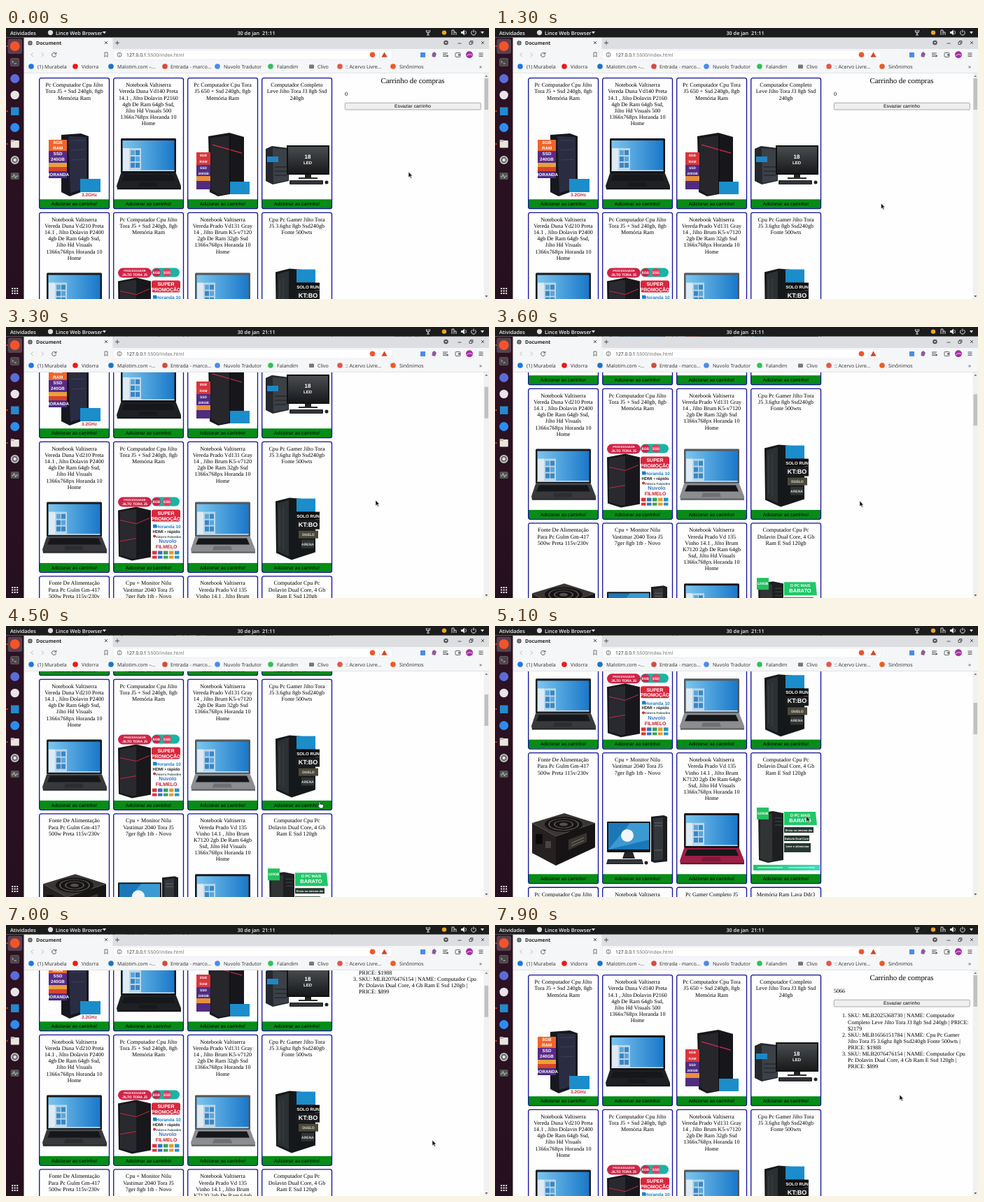
Write an HTML page that moves like this. It is 690 px wide and 388 px high and loops after 8 s.

```html
<!DOCTYPE html>
<html lang="pt-BR">
<head>
<meta charset="utf-8">
<title>Document</title>
<style>
html, body { margin: 0; width: 100%; height: 100%; overflow: hidden; background: #fefefe; }
svg { display: block; width: 690px; height: 388px; text-rendering: geometricPrecision; }
.serif { font-family: "Liberation Serif", serif; }
.sans { font-family: "Liberation Sans", sans-serif; }
.ui { font-family: "Open Sans", sans-serif; }
</style>
</head>
<body>
<svg id="stage" viewBox="0 0 690 388"></svg>
<script>
const rect = (x, y, w, h, fill, more = '') =>
  `<rect x="${x}" y="${y}" width="${w}" height="${h}" fill="${fill}" ${more}/>`;
const dot = (x, y, r, fill, more = '') => `<circle cx="${x}" cy="${y}" r="${r}" fill="${fill}" ${more}/>`;
const poly = (pts, fill, more = '') => `<polygon points="${pts}" fill="${fill}" ${more}/>`;
const line = (d, color, w = 1) => `<path d="${d}" fill="none" stroke="${color}" stroke-width="${w}"/>`;
const text = (x, y, size, str, more = '', font = 'ui') =>
  `<text x="${x}" y="${y}" font-size="${size}" class="${font}" ${more}>${str}</text>`;
const mid = 'text-anchor="middle"';
const label = (x, y, size, str, fill = '#fff') =>
  text(x, y, size, str, `${mid} font-weight="bold" fill="${fill}"`, 'sans');

// Product pictures, relative to the card corner
const laptop = (body, base) =>
  rect(11, 87, 79, 50, body, 'rx="1.5"') + rect(13.5, 90, 74, 44, 'url(#desk)') +
  rect(14, 101, 9, 32, '#dfeaf3') + rect(23, 101, 17, 32, '#b9d6ea') +
  [0, 1, 2, 3, 4, 5].map(i => rect(25 + i % 2 * 7, 104 + (i >> 1) * 9, 6, 7, i % 3 ? '#3a86c4' : '#5aa5d8')).join('') +
  rect(13.5, 132.5, 74, 1.5, '#d3e3ee') +
  poly('11,137 90,137 97,155 97,160 6,160 5,155', base) +
  poly('16,139 85,139 89,148 12,148', '#16171a') + poly('38,150 62,150 64,156 36,156', '#0003') +
  rect(6, 158, 91, 2.5, '#0005');

const stickers = (x, y, w, list) => list.map(([h, fill, str]) => {
  const s = rect(x, y, w, h, fill) + (str ? label(x + w / 2, y + h * .72, w * .24, str) : '');
  y += h;
  return s;
}).join('');

const stickerTower = () =>
  poly('32,82 60,80 71,84 71,160 44,170 32,164', '#16171f') + poly('42,84 68,85 68,158 45,165', '#2a2d42') +
  line('M46 90L66 90M46 104L66 103M47 118L66 117', '#41455c', .8) +
  stickers(14, 89, 26, [[8, '#f0642a', '8GB'], [8, '#f0642a', 'RAM'], [8, '#5a2b86', 'SSD'],
    [9, '#5a2b86', '240GB'], [6, '#e8a13a', ''], [6, '#d8432c', ''], [10, '#4b2d83', 'HORANDA']]) +
  rect(59, 145, 29, 19, '#1b8dcb') + label(72, 170, 6.5, '3.2GHz', '#d3263a');

const redLineTower = () =>
  poly('30,84 60,79 81,85 81,163 44,170 32,164', '#17171b') + poly('33,87 60,83 60,166 45,168 34,161', '#26262b') +
  line('M36 96L78 108', '#d22c50', 1.3) + line('M61 82V166', '#08080a') +
  stickers(13, 107, 20, [[9, '#d8363c', '8GB'], [9, '#d8363c', 'RAM'], [8, '#4f2c80', 'SSD'],
    [8, '#4f2c80', '240GB'], [7, '#e7903a', ''], [12, '#4f2c80', '']]) +
  rect(61, 149, 28, 18, '#1b8dcb');

const ledKit = () =>
  poly('6,102 15,98 39,101 39,148 16,153 6,148', '#25282d') + poly('16,101 38,103 38,147 17,151', '#3c4148') +
  rect(8, 113, 16, 8, '#1d87c6') + line('M19 128H36M19 134H36M19 140H36', '#1b1d20', 1.2) +
  rect(36, 97, 61, 42, '#111') + rect(38, 99, 57, 38, 'url(#city)') +
  label(66, 116, 8, '18') + label(66, 124, 6, 'LED') + rect(62, 139, 9, 5, '#222') +
  rect(53, 143, 27, 2, '#2b2b2b') + rect(40, 147, 48, 6, '#25262a', 'rx="1"') + dot(93, 150, 2.5, '#222') +
  line('M42 149H86M42 151H86', '#555', .6);

const promoTower = () =>
  rect(7, 80, 48, 14, '#cf2447', 'rx="7"') + label(31, 85.5, 4, 'PROCESSADOR') + label(31, 91.5, 5, 'JILTO TORA J5') +
  rect(55, 80, 40, 13, '#1bb3a4', 'rx="6.5"') + dot(62, 86.5, 6, '#cf2447') + dot(77, 86.5, 6, '#e53d5d') +
  label(62, 88.5, 5, '8GB') + label(77, 88.5, 5, 'SSD') +
  poly('7,99 33,94 54,99 54,166 27,171 8,165', '#18181c') + poly('10,101 33,97 33,167 27,168 10,163', '#292930') +
  line('M10 113L33 118L52 110M10 143L33 139', '#c62b3c', 1) +
  rect(55, 98, 41, 17, '#d9273d', 'rx="3"') + label(75.5, 105.5, 7, 'SUPER') + label(75.5, 113, 7, 'PROMOÇÃO') +
  rect(57, 119, 5, 5, '#1a7fd0') + label(79, 124.5, 6.5, 'Horanda 10', '#1a7fd0') +
  label(76, 131, 6, 'HDMI ▪ rápido', '#222') +
  dot(59, 136, 2, '#d42d2d') + label(79, 138, 4.5, 'Vidorra Falandim', '#355') +
  label(78, 145.5, 7.5, 'Nuvolo', '#3574c8') + label(76, 153.5, 7, 'FILMELO', '#d11f2a') +
  ['#d33', '#3a6fc0', '#35a35a', '#e29a2b', '#2a93c9'].map((c, i) => rect(56 + i * 8, 157, 6.5, 5, c) + rect(56 + i * 8, 164, 6.5, 4, c)).join('');

const gamerTower = () =>
  poly('20,86 40,81 77,84 77,159 43,170 21,160', '#15181a') + poly('23,89 39,84 39,165 23,158', '#2b3032') +
  line('M26 96V152M31 94V155', '#444b4d', .8) +
  rect(50, 82, 27, 19, '#1b8dcb') + rect(50, 101, 33, 11, '#0c0c0c') + label(66.5, 109, 6.2, 'SOLO RUN') +
  rect(50, 112, 33, 14, '#1b1d1f') + label(66.5, 122, 9, 'KT:BO') +
  rect(53, 128, 28, 11, '#4d4a3b') + label(67, 135.5, 5, 'DUELO', '#ddd') +
  rect(57, 141, 18, 12, '#2f3533') + label(66, 149, 5, 'ARENA', '#ddd');

const powerUnit = () =>
  poly('6,101 52,87 96,101 40,120', '#3a3634') + poly('6,101 40,120 40,162 6,144', '#242120') +
  poly('40,120 96,101 96,136 40,162', '#161414') +
  '<g transform="translate(51 103) scale(1 .4)">' + dot(0, 0, 27, '#151313') + dot(0, 0, 21, 'none', 'stroke="#5a5552" stroke-width="2"') +
  dot(0, 0, 13, 'none', 'stroke="#5a5552" stroke-width="2"') + dot(0, 0, 6, '#55504d') + '</g>' +
  rect(11, 117, 10, 14, '#0c0b0b') + rect(25, 127, 8, 10, '#4a4542') + poly('58,125 84,115 84,128 58,140', '#39342f') +
  line('M62 130L80 122M62 134L80 126', '#8d877f', .8);

const deskKit = () =>
  rect(7, 99, 62, 44, '#15171a', 'rx="1"') + rect(9, 101, 58, 38, '#1c77b8') + poly('9,139 40,101 67,101 67,125', '#3b9ad2') +
  dot(36, 119, 9, '#f2f6f9') + poly('32,143 44,143 47,152 29,152', '#24262a') +
  poly('70,92 88,90 93,92 93,156 75,158 70,156', '#1b1d20') + poly('73,95 87,93 87,153 74,155', '#33363a') +
  line('M75 101H86M75 105H86M75 140H86', '#777', .8) +
  poly('8,153 57,153 59,160 6,160', '#25272b') + line('M9 155.5H57M9 157.5H57', '#5c5f64', .6) + dot(63, 158, 2.5, '#222');

const greenTower = () =>
  poly('11,87 32,84 47,87 47,154 25,158 12,154', '#1d1f20') + poly('14,90 31,88 31,155 25,156 14,152', '#313435') +
  line('M35 94H45M35 99H45M35 104H45', '#555', .8) +
  rect(9, 79, 17, 17, '#22c25e') + label(17.5, 89, 5, '120GB') +
  poly('48,85 93,85 95,104 48,104', '#21c768') + label(71, 92, 5.5, 'O PC MAIS') + label(71, 100, 7.5, 'BARATO') +
  [[107, 42, 'Envia no mesmo dia'], [119, 36, 'Dolavin Dual Core'], [130, 38, 'Leve e silencioso']].map(([y, w, s]) =>
    rect(48, y, w, 8, '#25382f') + label(48 + w / 2, y + 5.6, 4, s)).join('') +
  rect(48, 138, 38, 5, '#25382f') + rect(4, 161, 95, 8, 'url(#strip)') + line('M10 165H46M54 165H92', '#e6fff3', 1);

const cards = [
  ['Pc Computador Cpu Jilto|Tora J5 + Ssd 240gb, 8gb|Memória Ram', stickerTower()],
  ['Notebook Valtiserra|Vereda Duna Vd140 Preta|14.1 , Jilto Dolavin P2160|4gb De Ram 64gb Ssd,|Jilto Hd Visuals 500|1366x768px Horanda 10|Home', laptop('#131417', '#1f2024')],
  ['Pc Computador Cpu Tora|J5 650 + Ssd 240gb, 8gb|Memória Ram', redLineTower()],
  ['Computador Completo|Leve Jilto Tora J3 8gb Ssd|240gb', ledKit()],
  ['Notebook Valtiserra|Vereda Duna Vd210 Preta|14.1 , Jilto Dolavin P2400|4gb De Ram 64gb Ssd,|Jilto Hd Visuals|1366x768px Horanda 10|Home', laptop('#1b1c1f', '#38393d')],
  ['Pc Computador Cpu Jilto|Tora J5 + Ssd 240gb, 8gb|Memória Ram', promoTower()],
  ['Notebook Valtiserra|Vereda Prado Vd131 Gray|14 , Jilto Brum K5-v7120|2gb De Ram 32gb Ssd|1366x768px Horanda 10|Home', laptop('#55585c', '#8b8d90')],
  ['Cpu Pc Gamer Jilto Tora|J5 3.6ghz 8gb Ssd240gb|Fonte 500wts', gamerTower()],
  ['Fonte De Alimentação|Para Pc Gulm Gm-417|500w Preta 115v/230v', powerUnit()],
  ['Cpu + Monitor Nilu|Vastimar 2040 Tora J5|7ger 8gb 1tb - Novo', deskKit()],
  ['Notebook Valtiserra|Vereda Prado Vd 135|Vinho 14.1 , Jilto Brum|K7120 2gb De Ram 64gb|Ssd, Jilto Hd Visuals|1366x768px Horanda 10|Home', laptop('#1a1518', '#9c1f45')],
  ['Computador Cpu Pc|Dolavin Dual Core, 4 Gb|Ram E Ssd 120gb', greenTower()],
  ['Pc Computador Cpu Jilto|Tora J5 Ssd 240gb / 8gb|Memória Ram', ''],
  ['Notebook Valtiserra|Vereda Prado Vd134 Cinza|14.1 , Jilto Brum K7120|2gb De Ram 64gb Ssd,|Jilto Hd Visuals|1366x768px Horanda 10|Home', ''],
  ['Pc Gamer Completo J5|16gb 1tb Monitor + Kit|Gamer Full Hd', ''],
  ['Memória Ram Lava Ddr3|Color Azul 8gb 1 Talvoz|Tz208c11k/8', '']
];

const card = ([title, art], i) =>
  `<g transform="translate(${47 + i % 4 * 106} ${71 + (i >> 2) * 192.6})">` + art +
  rect(1, 174.3, 99, 13, '#078c17') +
  text(50.5, 183, 6.73, 'Adicionar ao carrinho!', mid, 'sans') +
  rect(.7, .7, 99.8, 187, 'none', 'rx="2.5" stroke="#10109a" stroke-width="1.3"') +
  title.split('|').map((s, n) => text(50.5, 13.3 + n * 9.15, 8.08, s, mid, 'serif')).join('') + '</g>';

const orders = [
  [2400, 2179, 'SKU: MLB2025368730 | NAME: Computador', 'Completo Leve Jilto Tora J3 8gb Ssd 240gb | PRICE:', '$2179'],
  [4700, 1988, 'SKU: MLB1656151784 | NAME: Cpu Pc Gamer', 'Jilto Tora J5 3.6ghz 8gb Ssd240gb Fonte 500wts |', 'PRICE: $1988'],
  [6000, 899, 'SKU: MLB2076476154 | NAME: Computador Cpu', 'Pc Dolavin Dual Core, 4 Gb Ram E Ssd 120gb |', 'PRICE: $899']
];

const cart = text(581, 78.5, 10.85, 'Carrinho de compras', mid, 'serif') +
  text(484, 96.5, 8.08, '0', 'id="total"', 'serif') +
  rect(484.3, 107.2, 194, 9.8, '#efefef', 'rx="1.5" stroke="#767676" stroke-width=".6"') +
  text(581, 114.4, 6.73, 'Esvaziar carrinho', mid, 'sans') +
  orders.map(([, , ...rows], i) => '<g class="order">' +
    text(502, 132.4 + i * 27.3, 8.08, i + 1 + '.', 'text-anchor="end"', 'serif') +
    rows.map((s, n) => text(504, 132.4 + (i * 3 + n) * 9.1, 8.08, s, '', 'serif')).join('') + '</g>').join('');

const bookmarks = [
  [36, 45, '#1877e8', '(1) Murabela'], [99, 108, '#f01818', 'Vidorra'], [150, 159, '#1b74c8', 'Malotim.com –…'],
  [227, 235, '#d9493c', 'Entrada - marco…'], [302, 311, '#4a8af0', 'Nuvolo Tradutor'], [378, 387, '#2fc254', 'Falandim'],
  [437, 445, '#777', 'Clivo'], [477, 485, '#e2574a', ':: Acervo Livre…'], [553, 562, '#ee5a24', 'Sinônimos']
];

const topBar = rect(0, 0, 690, 13.5, '#1c1c1c') +
  '<g fill="#f2f2f2" font-weight="600">' + text(6, 9.5, 7.3, 'Atividades') +
  text(71, 9.5, 7.3, 'Lince Web Browser') + text(357.5, 9.5, 7.3, '30 de jan&#160; 21:11', mid) + '</g>' +
  dot(63.5, 6.6, 3.6, '#ddd') + poly('138,5 143,5 140.5,8.5', '#eee') +
  line('M600.5 3V6Q603 9 605.5 6V3M603 3V10M601 10H605', '#ddd', 1) + dot(626, 6.6, 3.2, '#f0a51c') +
  line('M637 10V3H640V10M640 6H643V10', '#ddd', 1) +
  poly('650,5 652,5 655,2.5 655,10.5 652,8 650,8', '#eee') + line('M656.5 4Q658.5 6.5 656.5 9', '#eee', .9) +
  line('M666 4.2A3.3 3.3 0 1 0 670 4.2M668 2.5V6.5', '#eee', 1) + poly('678,5 683,5 680.5,8.5', '#eee');

const dock = rect(0, 13.5, 25.5, 375, 'url(#dock)') + rect(2.5, 15.5, 20.5, 21.5, '#fff3', 'rx="3"') +
  [26, 119, 166].map(y => dot(1.6, y, 1.1, '#e95420')).join('') + dot(12.7, 26, 7, '#f4532a') +
  rect(6.5, 43.5, 12, 11, '#4a4548', 'rx="1.5" stroke="#777" stroke-width=".6"') + line('M8.5 47L10.5 48.5L8.5 50M11.5 51H15', '#ddd', .8) +
  dot(12.7, 72.5, 6.5, '#5b6cd8') + dot(12.7, 96, 6.2, '#e8e4e8') + rect(7, 113.5, 11.5, 11.5, '#2489ca') + dot(12.7, 142.5, 6.5, '#2d8cf0') +
  rect(6.8, 161, 12, 10.5, '#e9e4dc', 'rx="1"') + rect(6.8, 160, 5, 3, '#bdb5ac') +
  dot(12.7, 189, 5.3, '#777', 'stroke="#ddd" stroke-width="1.3"') + dot(12.7, 189, 2, '#eee') +
  rect(6.7, 207, 12, 10, '#555', 'rx="1.5"') + line('M8 213H10L11.5 209.5L13.5 215L15 212H17.5', '#cfc', .7) +
  [0, 1, 2, 3, 4, 5, 6, 7, 8].map(i => rect(8.2 + i % 3 * 3.5, 372 + Math.floor(i / 3) * 3.5, 2, 2, '#f4f4f4')).join('');

const browser = rect(25.5, 13.5, 664.5, 17, '#dcdee1') + rect(25.5, 14, 127, 17, '#f5f6f7', 'rx="2"') +
  rect(25.5, 30, 664.5, 35, '#f5f6f7') + rect(25.5, 64.4, 664.5, .6, '#d6d8da') +
  dot(34.5, 21.5, 3.2, '#555') + line('M31.5 21.5H37.5M34.5 18.5V24.5', '#ccc', .5) +
  text(43, 24, 7, 'Document', 'font-weight="bold" fill="#222"') +
  line('M141 19L145 23M145 19L141 23M156 21.3H162M159 18.3V24.3', '#444', .9) +
  dot(628.5, 21, 3.3, '#555') + poly('626.8,20.2 630.2,20.2 628.5,22.3', '#fff') +
  line('M645.5 22H650.5M662 20H665.5V23.5H662ZM663.5 20V18.5H667V22H665.5M679 19L683 23M683 19L679 23', '#444', .9) +
  line('M39 35.5L35.5 38.3L39 41M50.5 35.5L54 38.3L50.5 41', '#bbb', .9) +
  line('M71 36.6A3 3 0 1 0 71.6 39M71.8 34.8V37.2H69.4', '#444', .9) + line('M141 35V41.5L143 39.5L145 41.5V35Z', '#555', .8) +
  rect(153.5, 32, 398, 13, '#fff', 'rx="2" stroke="#e1e3e5" stroke-width=".5"') +
  dot(162, 38.3, 3, 'none', 'stroke="#555" stroke-width=".8"') + line('M162 37.8V40.3M162 36V36.9', '#555', .8) +
  text(172, 40.8, 6.8, '127.0.0.1<tspan fill="#666">:5500/index.html</tspan>', 'fill="#222"') +
  dot(523.5, 38.3, 3.8, '#f4532a') + rect(533.3, 33, .6, 11, '#ddd') + poly('540.5,34.5 544.7,41.8 536.3,41.8', '#d2452f') +
  rect(592, 35, 7, 7, '#4b8bea') + poly('612,34 615,37 613,42 608.5,41 609,36', '#8a5c9c') +
  line('M624 36H631M624 38.3H629M624 40.6H629', '#555', 1) + poly('629.5,38 632.5,40 629.5,42', '#555') +
  rect(642, 35.5, 7, 6, 'none', 'rx="1" stroke="#555" stroke-width=".9"') + rect(646, 37.5, 3, 2, '#555') +
  dot(662, 38.3, 5, '#a02fa8') + line('M658 40Q662 36 666 39', '#f58ad0', 1.5) + line('M675.5 36H681.5M675.5 38.3H681.5M675.5 40.6H681.5', '#444', .9) +
  bookmarks.map(([x, tx, c, s]) => (c === '#777' ? rect(x - 4, 52.5, 7, 5.5, c, 'rx=".8"') : dot(x, 55, 3.8, c)) +
    text(tx, 57.7, 7.1, s, 'fill="#2b2b2b"')).join('') + text(676, 57.5, 8, '»', 'fill="#444"');

const scrollbar = rect(682.5, 65, 7.5, 323, '#f1f1f1') + rect(683.5, 72, 5.5, 45, '#c1c1c1', 'id="thumb"') +
  poly('684.3,70 688.3,70 686.3,67.5', '#777') + poly('684.3,383 688.3,383 686.3,385.5', '#555');

const gradient = (id, a, b, more = '') => `<linearGradient id="${id}" ${more}><stop stop-color="${a}"/><stop offset="1" stop-color="${b}"/></linearGradient>`;
const stage = document.getElementById('stage');
stage.innerHTML = '<defs>' + gradient('desk', '#7cc6ee', '#1a78c9') + gradient('city', '#4a4d50', '#17191b', 'x2="0" y2="1"') +
  gradient('strip', '#1fc46a', '#3fd9c0') + gradient('dock', '#2e1223', '#25101f', 'x2="0" y2="1"') + '</defs>' +
  rect(0, 0, 690, 388, '#fefefe') + `<g id="page">${cards.map(card).join('')}${cart}</g>` + scrollbar + browser + dock + topBar +
  '<path id="arrow" d="M0 0V8L1.9 6.3L3.2 9.2L4.5 8.6L3.2 5.8H5.6Z" fill="#111" stroke="#fff" stroke-width=".5"/>' +
  '<path id="hand" d="M0 .5Q.9-.8 1.8.5V3L5.8 3.7Q6.7 4 6.5 5.2L5.8 9H1.3L-1.7 5.3Q-1.6 4 0 5Z" fill="#fff" stroke="#111" stroke-width=".7"/>';

const el = id => document.getElementById(id);
const marks = [...document.querySelectorAll('.order')];
const scrollKeys = [[3000, 0], [3300, 100], [3500, 164], [3700, 188], [4700, 188], [5000, 260], [5400, 321],
  [6500, 321], [6700, 250], [7000, 107], [7300, 15], [7400, 0]];
const mouseKeys = [[0, 575, 206], [600, 586, 214], [1000, 586, 230], [1400, 540, 258], [1800, 471, 261], [2000, 454, 251],
  [2600, 454, 251], [2900, 526, 246], [3300, 528, 248], [3900, 514, 250], [4400, 447, 252], [4800, 447, 252], [5600, 441, 306],
  [5800, 440, 314], [6200, 440, 314], [6400, 582, 313], [6600, 590, 312], [7000, 609, 308], [7400, 609, 308], [7800, 578, 243]];
const handTimes = [[2200, 2700], [4400, 5000], [5800, 6300]];

function at(keys, t) {
  const i = keys.findIndex(k => k[0] > t);
  if (i === 0) return keys[0].slice(1);
  if (i < 0) return keys[keys.length - 1].slice(1);
  const a = keys[i - 1], b = keys[i], f = (t - a[0]) / (b[0] - a[0]);
  return a.slice(1).map((v, n) => v + (b[n + 1] - v) * f);
}

function draw(now) {
  const t = Math.floor(now % 8000 / 100) * 100; // ten pictures a second
  const [scroll] = at(scrollKeys, t);
  const [x, y] = at(mouseKeys, t);
  const hand = handTimes.some(([a, b]) => t >= a && t < b);
  el('page').setAttribute('transform', `translate(0 ${-scroll})`);
  el('thumb').setAttribute('y', 72 + scroll * .138);
  el('total').textContent = orders.reduce((sum, o) => sum + (t >= o[0] ? o[1] : 0), 0);
  marks.forEach((m, i) => m.style.display = t >= orders[i][0] ? '' : 'none');
  for (const [id, on] of [['arrow', !hand], ['hand', hand]]) {
    el(id).style.display = on ? '' : 'none';
    el(id).setAttribute('transform', `translate(${x} ${y})`);
  }
  requestAnimationFrame(draw);
}
draw(0);
</script>
</body>
</html>
```
